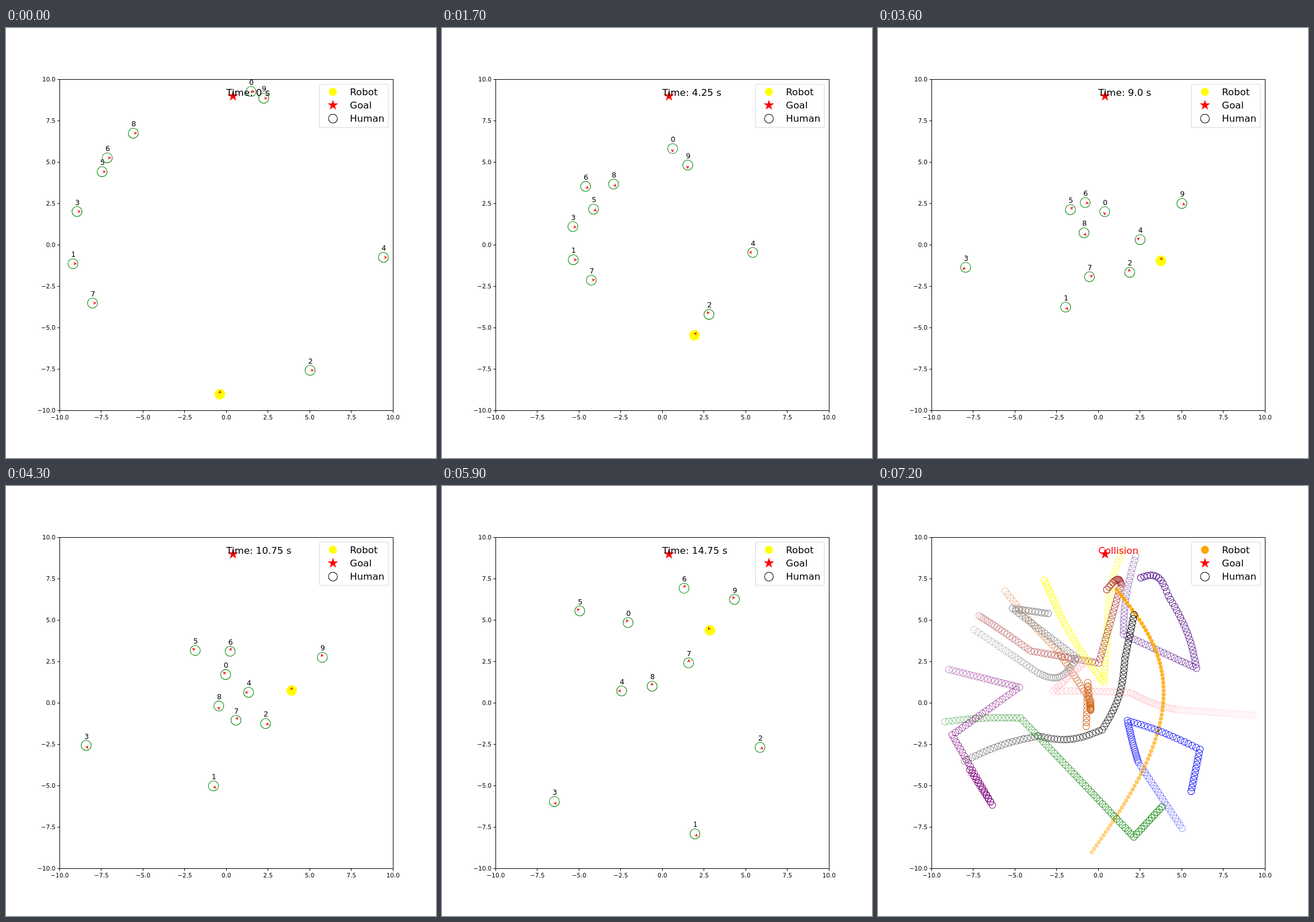
Write an HTML page with a canvas that moves like this. It is 748 by 748 pixels and loops after 7.3 s.

```html
<!DOCTYPE html>
<html lang="en">
<head>
<meta charset="utf-8">
<title>Robot among humans</title>
<style>
  html, body { margin: 0; width: 100%; height: 100%; overflow: hidden; background: #fff; }
  canvas { display: block; }
</style>
</head>
<body>
<canvas id="stage" width="748" height="748"></canvas>
<script>
const ctx = document.getElementById('stage').getContext('2d');
const STEP_MS = 100, STEPS = 73, LAST = STEPS - 2;
const LINE = 1.04, UNIT_X = 28.985, UNIT_Y = 28.798, MID_X = 383.35, MID_Y = 377.74;
const GOAL = [394.9, 118.5];

// Humans head for a new place every BEAT steps; the walk may bow aside on the way.
const BEAT = 20;

// Stops are [x, y, bowX, bowY]: the bow belongs to the leg that ends there.
function human(color, ...stops) {
  const at = k => {
    const leg = Math.min(Math.floor(k / BEAT), stops.length - 2);
    const start = leg * BEAT;
    const u = (k - start) / Math.min(BEAT, LAST - start);
    const [x0, y0] = stops[leg], [x1, y1, bowX = 0, bowY = 0] = stops[leg + 1];
    const bow = Math.sin(Math.PI * u);
    return [x0 + (x1 - x0) * u + bowX * bow, y0 + (y1 - y0) * u + bowY * bow];
  };
  return { color, at };
}

const humans = [
  human('yellow', [426.2, 110.4], [400, 229, -6, -3], [393, 342], [320, 231, 0, 6], [289.5, 164]),
  human('green', [116.5, 410.1], [248, 403.5, 0, -3], [346, 506], [445, 610.5], [494, 558]),
  human('blue', [529, 595.5], [453, 481], [434, 408, 0, 4], [560, 458, -3, -5], [544.8, 531]),
  human('purple', [123.5, 319.3], [246, 350], [129, 433], [199, 555], [160, 494]),
  human('pink', [656.5, 399], [520, 389], [440, 360, 0, 4], [305, 356.5, 5, -1], [356, 309]),
  human('gray', [167.2, 250], [278, 325, 5, 3], [346, 299, 4, 20], [234, 213], [296, 221.8]),
  human('brown', [176.2, 225.9], [266, 287, -6, -5], [384, 308], [423, 171], [398, 180.3, 5, -13]),
  human('black', [150.5, 478.5], [279, 435, 0, -6], [390, 424, 0, 11], [429.5, 301, 9, 4], [445.3, 224]),
  human('chocolate', [221.5, 183], [312, 285, 0, 4], [370, 374], [365, 342, 2, 30], [362.3, 418]),
  human('indigo', [448.3, 122.2], [427, 258, -6, 2], [554, 317], [505, 191, 8, 0], [457, 159.5, 5, -17])
];

// The robot swings out to the right on its way up.
const robot = {
  color: 'orange',
  at(k) {
    const u = k / LAST, sway = Math.sin(2 * Math.PI * u);
    return [372 + 43 * u + 98 * Math.sin(Math.PI * u) - 10 * sway, 636.9 - 457 * u + 7 * sway];
  }
};

function text(str, x, y, size, align = 'left', color = 'black') {
  ctx.font = `${size}px "DejaVu Sans", sans-serif`;
  ctx.textAlign = align;
  ctx.fillStyle = color;
  ctx.fillText(str, x, y);
}

function disc([x, y], r, edge, fill) {
  ctx.beginPath();
  ctx.arc(x, y, r, 0, 2 * Math.PI);
  if (fill) { ctx.fillStyle = fill; ctx.fill(); }
  ctx.strokeStyle = edge;
  ctx.lineWidth = LINE;
  ctx.stroke();
}

function star([x, y]) {
  ctx.beginPath();
  for (let i = 0; i < 10; i++) {
    const r = i % 2 ? 2.98 : 7.8, a = i * Math.PI / 5;
    ctx.lineTo(x + r * Math.sin(a), y - r * Math.cos(a));
  }
  ctx.closePath();
  ctx.fillStyle = ctx.strokeStyle = 'red';
  ctx.lineWidth = LINE;
  ctx.fill();
  ctx.stroke();
}

function arrow([x, y], angle) {
  ctx.save();
  ctx.translate(x, y);
  ctx.rotate(angle);
  ctx.strokeStyle = 'red';
  ctx.lineWidth = LINE;
  ctx.beginPath();
  ctx.moveTo(2.1, 0);
  ctx.lineTo(5.5, 0);
  ctx.moveTo(1.3, -2.1);
  ctx.lineTo(5.5, 0);
  ctx.lineTo(1.3, 2.1);
  ctx.stroke();
  ctx.restore();
}

function heading(agent, k, first) {
  if (!k) return first;
  const [x0, y0] = agent.at(k - 1), [x1, y1] = agent.at(k);
  return Math.atan2(y1 - y0, x1 - x0);
}

function axes() {
  ctx.strokeStyle = 'black';
  ctx.lineWidth = 1;
  ctx.strokeRect(93.5, 89.5, 580, 576);
  for (let v = -10; v <= 10; v += 2.5) {
    const label = v.toFixed(1).replace('-', '\u2212');
    const x = MID_X + v * UNIT_X, y = MID_Y - v * UNIT_Y;
    const px = Math.floor(x) + 0.5, py = Math.floor(y) + 0.5;
    ctx.beginPath();
    ctx.moveTo(px, 666);
    ctx.lineTo(px, 669.5);
    ctx.moveTo(93, py);
    ctx.lineTo(89.5, py);
    ctx.stroke();
    text(label, x, 681, 10.39, 'center');
    text(label, 86.2, y + 3.2, 10.39, 'right');
  }
}

function legend(robotColor) {
  ctx.beginPath();
  ctx.roundRect(545.4, 97.7, 119.8, 75.3, 3.3);
  ctx.fillStyle = 'rgba(255,255,255,.8)';
  ctx.fill();
  ctx.strokeStyle = 'rgba(204,204,204,.8)';
  ctx.lineWidth = LINE;
  ctx.stroke();
  disc([568.7, 111], 6.4, robotColor, robotColor);
  star([568.7, 134.3]);
  disc([568.7, 157.6], 7.7, 'black');
  ['Robot', 'Goal', 'Human'].forEach((name, i) => text(name, 598.3, 116.6 + 23.3 * i, 16.62));
}

function scene(k) {
  const here = robot.at(k);
  disc(here, 8.7, 'yellow', 'yellow');
  humans.forEach(h => disc(h.at(k), 8.7, 'green'));
  arrow(here, heading(robot, k, -Math.PI / 2));
  humans.forEach(h => arrow(h.at(k), heading(h, k, 0)));
  star(GOAL);
  humans.forEach((h, i) => {
    const [x, y] = h.at(k);
    text(i, x - 3.2, y - 11.8, 12.47);
  });
  const seconds = k / 4;
  const shown = k && k % 4 === 0 ? seconds.toFixed(1) : seconds;
  text(`Time: ${shown} s`, MID_X, 118, 16.62);
}

function trails() {
  for (let k = 0; k <= LAST; k++) {
    ctx.globalAlpha = 0.4 + 0.6 * k / LAST;
    disc(robot.at(k), 2.9, robot.color, robot.color);
    humans.forEach(h => disc(h.at(k), 5.8, h.color));
  }
  ctx.globalAlpha = 1;
  star(GOAL);
  text('Collision', MID_X, 118, 16.62, 'left', 'red');
}

function draw() {
  const k = Math.floor(performance.now() / STEP_MS) % STEPS;
  const done = k > LAST;
  ctx.fillStyle = 'white';
  ctx.fillRect(0, 0, 748, 748);
  axes();
  if (done) trails(); else scene(k);
  legend(done ? 'orange' : 'yellow');
  requestAnimationFrame(draw);
}
draw();
</script>
</body>
</html>
```
